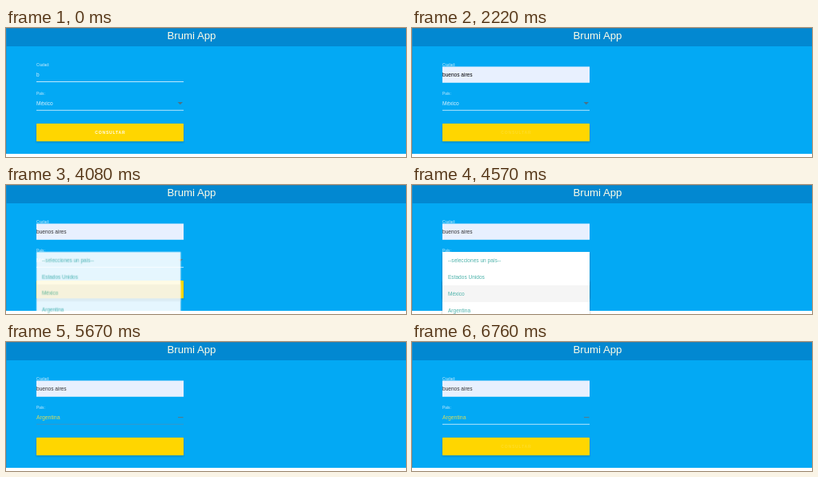
Animation of 500x162 px, one loop 6.88 s. Source, as an HTML page:

```html
<!DOCTYPE html>
<html lang="es">
<head>
<meta charset="utf-8">
<title>Brumi App</title>
<style>
html, body { margin: 0; width: 100%; height: 100%; overflow: hidden; background: #fff; }
svg { display: block; width: 500px; height: 162px; }
text { font: 6.55px "Liberation Sans", Arial, sans-serif; }

/* Every animated part shares one 6.88 s loop with hard steps. */
.anim { animation: 6.88s step-end infinite; }

.title { font-size: 13.2px; fill: #fffde7; }
.label { font-size: 4.7px; fill: #d5effc; }
.value { fill: #d9f1fd; }
.filled { fill: #333; animation-name: filled; }
.picked { font-size: 6.9px; fill: #d6dc5c; animation-name: picked; }
.caption { font-size: 5px; font-weight: bold; letter-spacing: .85px; fill: #fffdf0; animation-name: caption; }
.button { fill: #ffd600; animation-name: button; }
.first { animation-name: first; }
.bar { fill: #bfe8fc; animation-name: bar; }
.typed { animation-name: typed; }
.typing-caret { animation-name: typing-caret; }
.autofill { animation-name: autofill; }
.end-caret { animation-name: end-caret; }
.chosen { animation-name: chosen; }
.rule { fill: #b5e5fc; animation-name: rule; }
.menu { transform-origin: 38px 84px; animation-name: menu; }
.menu text { fill: #4fb3ab; }
.row { fill: #f5f5f5; }
.row1 { animation-name: row1; }
.row2 { animation-name: row2; }
.row4 { animation-name: row4; }

@keyframes caption {
  0% { opacity: 1; } 3.634% { opacity: .55; } 5.378% { opacity: .16; }
  57.558% { opacity: 0; }
  86.047% { opacity: .06; } 87.791% { opacity: .16; } 89.535% { opacity: .26; }
  91.279% { opacity: .34; } 94.767% { opacity: .3; }
  96.512% { opacity: .24; } 98.256%, 100% { opacity: .16; }
}
@keyframes button {
  0% { fill: #ffd600; } 87.791% { fill: #ffd918; } 89.535% { fill: #ffdc2c; }
  91.279% { fill: #ffde40; } 96.512% { fill: #ffda20; } 98.256%, 100% { fill: #ffd600; }
}
@keyframes bar {
  0% { fill: #bfe8fc; height: 1px; } 10.756% { fill: #cbecfd; height: 1.1px; }
  12.5% { fill: #dcf3fd; height: 1.3px; } 14.244%, 100% { fill: #e8f7fe; height: 1.5px; }
}
@keyframes typed { 0% { opacity: 1; } 19.622%, 100% { opacity: 0; } }
@keyframes typing-caret { 0% { opacity: 0; } 10.756% { opacity: .8; } 19.622%, 100% { opacity: 0; } }
@keyframes autofill { 0% { opacity: 0; } 32.267%, 100% { opacity: 1; } }
@keyframes filled { 0% { fill: #000; } 52.18%, 100% { fill: #333; } }
@keyframes end-caret { 0% { opacity: 0; } 52.18% { opacity: 1; } 57.558%, 100% { opacity: 0; } }
@keyframes first { 0% { opacity: 1; } 73.692%, 100% { opacity: 0; } }
@keyframes picked { 0% { opacity: 0; } 73.692%, 100% { opacity: 1; } }
@keyframes chosen { 0% { opacity: 0; } 73.692%, 100% { opacity: 1; } }
@keyframes rule {
  0% { fill: #b5e5fc; } 73.692% { fill: #4aa9da; } 82.413% { fill: #3598cb; }
  86.047% { fill: #4faedc; } 87.791% { fill: #76c6ec; } 89.535% { fill: #98d9f6; }
  91.279%, 100% { fill: #b5e5fc; }
}
@keyframes menu {
  0% { opacity: 0; transform: scale(.8); }
  57.558% { opacity: .45; transform: scale(.88); }
  59.302% { opacity: .9; transform: scale(.98); }
  61.047% { opacity: 1; transform: none; }
  73.692% { opacity: .9; transform: scale(.98); }
  75.436% { opacity: .55; transform: scale(.85); }
  77.18% { opacity: .2; transform: scale(.6); }
  78.924%, 100% { opacity: 0; transform: scale(.3); }
}
@keyframes row1 { 0% { opacity: 0; } 61.047% { opacity: 1; } 64.68%, 100% { opacity: 0; } }
@keyframes row2 { 0% { opacity: 0; } 64.68% { opacity: 1; } 66.424%, 100% { opacity: 0; } }
@keyframes row4 { 0% { opacity: 0; } 70.058%, 100% { opacity: 1; } }
</style>
</head>
<body>
<svg viewBox="0 0 500 162">
  <defs>
    <filter id="shadow" x="-10%" y="-30%" width="120%" height="170%">
      <feDropShadow dx="0" dy="1" stdDeviation=".8" flood-opacity=".3"/>
    </filter>
  </defs>

  <rect width="500" height="158" fill="#03a9f4"/>
  <rect width="500" height="23" fill="#0288d1"/>
  <rect width="500" height="1" fill="#2a7fb0"/>
  <rect width=".7" height="158" fill="#2a8fc4"/>
  <text class="title" x="232" y="14.3" text-anchor="middle">Brumi App</text>

  <text class="label" x="38" y="48">Ciudad:</text>
  <rect class="bar anim" x="38" y="67" width="184" height="1"/>
  <text class="value typed anim" x="38" y="61">b</text>
  <rect class="typing-caret anim" x="42" y="54" width=".7" height="8.5" fill="#fff"/>
  <g class="autofill anim">
    <rect x="38" y="48.5" width="184" height="20" fill="#e8f0fe"/>
    <text class="filled anim" x="38" y="61">buenos aires</text>
    <rect class="end-caret anim" x="75" y="54" width=".8" height="8.5" fill="#222"/>
  </g>

  <text class="label" x="38" y="84">País:</text>
  <text class="value first anim" x="38" y="96.7">México</text>
  <text class="picked anim" x="38" y="96.7">Argentina</text>
  <path class="first anim" d="M214.5 93h6.5l-3.25 3.2z" fill="#4d7286"/>
  <rect class="chosen anim" x="215" y="94" width="6.5" height="1.2" fill="#4d7f94"/>
  <rect class="rule anim" x="38" y="102.8" width="184" height="1"/>

  <rect class="button anim" x="38" y="120" width="184" height="22.3" rx=".6" filter="url(#shadow)"/>
  <text class="caption anim" x="130.4" y="133.2" text-anchor="middle">CONSULTAR</text>

  <g class="menu anim">
    <rect x="38" y="84" width="184" height="90" fill="#fff" filter="url(#shadow)"/>
    <rect class="row row1 anim" x="38" y="84" width="184" height="21"/>
    <rect class="row row2 anim" x="38" y="105" width="184" height="21"/>
    <rect class="row" x="38" y="126" width="184" height="21"/>
    <rect class="row row4 anim" x="38" y="147" width="184" height="21"/>
    <text x="45" y="97.3">--selecciones un país--</text>
    <text x="45" y="118.3">Estados Unidos</text>
    <text x="45" y="139.3">México</text>
    <text x="45" y="160.3">Argentina</text>
  </g>
</svg>
</body>
</html>
```
